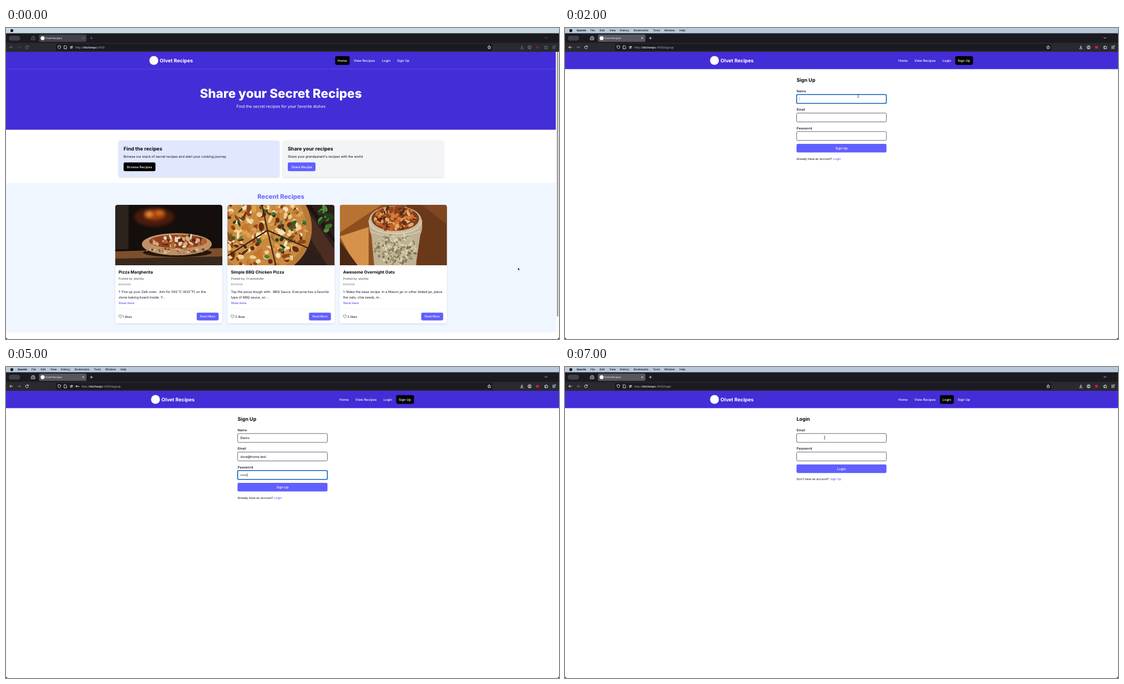
Recreate the animation shown at these times as an HTML page. Size 997 by 561 pixels, loop 8000 ms.

```html
<!DOCTYPE html>
<html lang="en">
<head>
<meta charset="utf-8">
<title>Recipe site sign-up</title>
<style>
  html, body { margin: 0; width: 100%; height: 100%; overflow: hidden; background: #fff; }
  svg { display: block; font-family: Inter, sans-serif; text-rendering: geometricPrecision; }
  text { white-space: pre; }
  .icon { fill: none; stroke: #fbfbfe; stroke-width: .8; stroke-linecap: round; stroke-linejoin: round; }
</style>
</head>
<body>
<svg id="stage" width="997" height="561" viewBox="0 0 997 561"></svg>
<script>
const INDIGO = '#432dd7', BUTTON = '#615fff', LINK = '#4f39f6', INK = '#08080f';
const BASE = 5.95, SMALL = 5.25;
const SITE = 'Olvet Recipes', EMAIL = 'dora@home.test';

// Text is placed by the middle of its capitals.
const text = (x, y, size, str, { fill = INK, weight = 400, anchor = 'start' } = {}) =>
  `<text x="${x}" y="${y + size * .364}" font-size="${size}" fill="${fill}" font-weight="${weight}"
    text-anchor="${anchor}">${str}</text>`;
const box = (x, y, w, h, fill, r = 0, extra = '') =>
  `<rect x="${x}" y="${y}" width="${w}" height="${h}" rx="${r}" fill="${fill}" ${extra}/>`;
const oval = (x, y, rx, ry, fill, extra = '') =>
  `<ellipse cx="${x}" cy="${y}" rx="${rx}" ry="${ry}" fill="${fill}" ${extra}/>`;
const path = (d, fill, extra = '') => `<path d="${d}" fill="${fill}" ${extra}/>`;
const icon = (x, y, d, extra = '') => `<path class="icon" transform="translate(${x} ${y})" d="${d}" ${extra}/>`;
const button = (x, y, w, h, label, fill, size = BASE) =>
  box(x, y, w, h, fill, 2.4) +
  text(x + w / 2, y + h / 2, size, label, { fill: '#fff', anchor: 'middle', weight: 500 });

function blobs(seed, count, cx, cy, rx, ry, size, colors) {
  const random = () => (seed = seed * 16807 % 2147483647) / 2147483647;
  let out = '';
  for (let i = 0; i < count; i++) {
    const angle = random() * 6.28, dist = Math.sqrt(random());
    const x = cx + Math.cos(angle) * dist * rx, y = cy + Math.sin(angle) * dist * ry;
    out += oval(x, y, size * (.5 + random()), size * (.3 + random() * .6), colors[i % colors.length],
      `transform="rotate(${random() * 180} ${x} ${y})"`);
  }
  return out;
}

const photos = [
  () => box(0, 0, 194, 109, '#140e0c') + box(0, 0, 24, 80, '#2c221e') +
    `<g filter="url(#soft)">${oval(70, 22, 36, 17, '#4a1a09') + oval(72, 18, 18, 8, '#a8400f') +
      oval(61, 17, 6, 4, '#ff9a3a') + oval(80, 14, 7, 3, '#f07d24')}</g>` +
    path('M0 84 L194 78 V109 H0Z', '#7d4f2d') + path('M0 97 L194 93 V109 H0Z', '#38281b') +
    oval(112, 86, 62, 8, '#24160d') + oval(111, 71, 63, 20, '#bd9166') + oval(113, 66, 52, 12, '#93401f') +
    blobs(19, 50, 113, 66, 47, 10, 4, ['#e6d6b6', '#b8602e', '#d2b083', '#512a17']) +
    blobs(5, 40, 111, 82, 56, 5, 2.5, ['#dcb688', '#6b4124', '#ab7b4d']),

  () => box(0, 0, 194, 109, '#2e1e1a') + path('M137 0 L194 82 V109 H180 L110 0Z', '#4b2d22') +
    path('M150 0 L194 62 V70 L141 0Z', '#1d120f') +
    oval(60, 42, 92, 88, '#b87a38') + oval(58, 42, 84, 80, '#c98a3f') +
    blobs(77, 260, 60, 44, 82, 74, 5.5, ['#efcf92', '#8f4519', '#dba251', '#f2e0b8', '#642c14', '#c5762f']) +
    blobs(41, 34, 72, 40, 70, 56, 4, ['#345f24', '#4f7d33', '#203f18']) +
    path('M72 46 L168 88 M72 46 L87 109 M72 46 L0 92 M72 46 L62 0', 'none', 'stroke="#3c2115" stroke-width="2.2"') +
    blobs(9, 20, 176, 26, 13, 22, 5, ['#3c7030', '#1f4119', '#568a3c']),

  () => box(0, 0, 194, 109, '#8d4f20') + path('M0 0 H75 L0 50Z', '#b87332') +
    path('M0 57 L52 40 V109 H28Z', '#d6924a') + path('M0 65 L32 109 H0Z', '#4c2814') +
    path('M120 0 H194 V109 H140Z', '#6a3919') + path('M148 0 H194 V36Z', '#7f4721') +
    path('M53 24 Q51 43 57 55 L62 109 H137 L145 55 Q151 42 147 24Z', '#bfb294') +
    blobs(31, 240, 100, 80, 37, 29, 2.8, ['#ddd3b8', '#9c916e', '#cbbd98', '#7d7355']) +
    oval(100, 27, 47, 25, '#cdbb98') + oval(100, 25, 43, 22, '#7c3f1e') +
    blobs(63, 130, 99, 24, 38, 20, 4, ['#da7a32', '#8d4422', '#e8a868', '#532a18', '#c46128']) +
    path('M52 28 Q56 51 100 52 Q144 51 148 28', 'none', 'stroke="#e4d9c2" stroke-width="1.8" opacity=".8"') +
    path('M56 48 Q100 66 144 48', 'none', 'stroke="#f1ead8" stroke-width="1.2" opacity=".7"')
];

const recipes = [
  ['Pizza Margherita', 'plumby', '9/22/2025', '1: Fire up your Zelk oven.  Aim for 500 ˚C (930 ˚F) on the',
    'stone baking board inside. Y...', 1],
  ['Simple BBQ Chicken Pizza', 'Crustwander', '9/17/2025',
    'Top the pizza dough with:  BBQ Sauce: Everyone has a favorite', 'type of BBQ sauce, so ...', 3],
  ['Awesome Overnight Oats', 'plumby', '9/17/2025',
    '1. Make the base recipe: In a Mason jar or other lidded jar, place', 'the oats, chia seeds, m...', 3]
];

function recipeCard([title, author, date, line1, line2, likes], i) {
  const grey = { fill: '#364153' }, body = { fill: '#101828' };
  return `<g transform="translate(${197 + 202.4 * i} 319)">` +
    box(0, 0, 193, 214, '#fff', 4.5, 'filter="url(#shadow)"') +
    `<g clip-path="url(#photo)">${photos[i]()}</g>` +
    text(6, 121, 7.5, title, { weight: 700 }) +
    text(6, 133.5, SMALL, 'Posted by: ' + author, grey) +
    text(6, 143.3, 4.45, date, { fill: '#4a5565' }) +
    text(6, 157.3, BASE, line1, body) + text(6, 166.7, BASE, line2, body) +
    text(6, 177, SMALL, 'Show more', { fill: LINK, weight: 500 }) +
    box(6, 187.6, 181, .5, '#e3e6ec') +
    icon(9, 201.2, 'M0 2.8 L-2.6 .2 C-4 -2 -1 -3.8 0 -1.6 C1 -3.8 4 -2 2.6 .2Z', 'style="stroke:#222b3a;stroke-width:.6"') +
    text(13.4, 201.4, BASE, likes + ' likes', body) +
    button(146.8, 194.6, 39.6, 13.8, 'Read More', BUTTON, SMALL) + '</g>';
}

function header(active, shift) {
  const links = [['Home', 598, 26], ['View Recipes', 627, 47], ['Login', 677.5, 25], ['Sign Up', 705, 32]];
  return oval(266.5 + shift, 58.5, 8, 8, '#fff') +
    text(277.3 + shift, 58.7, 8.9, SITE, { fill: '#fff', weight: 700 }) +
    links.map(([label, x, w]) =>
      (label === active ? box(x - 4.5 + shift, 50.8, w, 15.6, '#000', 2.4) : '') +
      text(x + shift, 58.5, BASE, label, { fill: '#fff', weight: 500 })).join('');
}

const promo = (x, w, fill, title, line, label, bw, color) =>
  box(x - 9, 203, w, 66, fill, 3, 'filter="url(#shadow)"') +
  text(x, 218, 8.95, title, { weight: 700 }) + text(x, 232, BASE, line) +
  button(x, 242.6, bw, 15.6, label, color);

const homePage = () =>
  box(0, 43, 991.5, 140.5, INDIGO) + box(0, 73.8, 991.5, .5, BUTTON) + header('Home', 0) +
  text(495.5, 118, 22.5, 'Share your Secret Recipes', { fill: '#fff', weight: 800, anchor: 'middle' }) +
  text(495.7, 141.2, 7.3, 'Find the secret recipes for your favorite dishes', { fill: '#fff', anchor: 'middle' }) +
  promo(212, 290, '#e0e7ff', 'Find the recipes', 'Browse our stack of secret recipes and start your cooking journey',
    'Browse Recipes', 57.5, '#000') +
  promo(508, 290, '#f3f4f6', 'Share your recipes', 'Share your grandparent\'s recipes with the world',
    'Share Recipe', 50, BUTTON) +
  box(0, 279.5, 991.5, 269.5, '#eff6ff') +
  text(495.5, 303.5, 11.2, 'Recent Recipes', { fill: BUTTON, weight: 700, anchor: 'middle' }) +
  recipes.map(recipeCard).join('') +
  box(991.5, 43, 5.5, 518, '#fafafa') + box(993.2, 43, 2.5, 477.5, '#979797', 1.2);

function formPage({ page, values = [], focus = -1, caret, popup }) {
  const signup = page === 'Sign Up';
  const labels = signup ? ['Name', 'Email', 'Password'] : ['Email', 'Password'];
  const end = 128 + 33.4 * labels.length;
  const fields = labels.map((label, i) => {
    const y = 128 + 33.4 * i, value = values[i] ?? '', focused = i === focus;
    const dots = label === 'Password' ? value.length : 0;
    const shown = dots ? '' : value;
    const mark = focused && caret && !dots ? '<tspan dx="-.6" font-weight="200">|</tspan>' : '';
    return text(417.5, y - 14.3, BASE, label, { weight: 500 }) +
      box(417.6, y - 8, 161.8, 16, '#fff', 2,
        focused ? 'stroke="#0b5fc4" stroke-width="1.6"' : 'stroke="#42425c" stroke-width=".8"') +
      text(422.5, y, BASE, shown + mark) +
      Array.from({ length: dots }, (_, n) => oval(423.9 + 2.95 * n, y + .3, .85, .85, INK)).join('') +
      (dots && focused && caret ? box(422.8 + 2.95 * dots, y - 3.5, .6, 7, INK) : '');
  }).join('');
  const [question, answer, x] = signup
    ? ['Already have an account?', 'Login', 483.6] : ['Don\'t have an account?', 'Sign Up', 478.2];
  return box(0, 43, 997, 31, INDIGO) + box(0, 73.8, 997, .5, BUTTON) + header(page, 3) +
    text(417.5, 93.5, 8.95, page, { weight: 700 }) + fields +
    button(417.4, end - 19.1, 162.2, 15.5, page, BUTTON) +
    text(417.5, end + 7.4, SMALL, question) + text(x, end + 7.4, SMALL, answer, { fill: LINK }) +
    (popup ? box(417.8, 169.6, 161.4, 13.4, '#17171b', 1.5, 'filter="url(#shadow)"') +
      text(420, 176.4, 4.9, 'Manage Passwords', { fill: '#fbfbfe' }) : '');
}

function browser({ idle, url = '', key }) {
  const light = { fill: '#fbfbfe' }, x = key ? 136 : 125;
  const menu = [['File', 46], ['Edit', 62.5], ['View', 80], ['History', 98.8], ['Bookmarks', 124],
    ['Tools', 158.5], ['Window', 179], ['Help', 206.3]];
  return box(0, 0, 997, 10, idle ? '#c9d9e3' : '#b6cadb') + oval(10.5, 4.7, 2.6, 2.6, '#0b0b0e') +
    (idle ? '' : text(21, 4.6, 4.9, 'Quenlo', { weight: 700 }) +
      menu.map(([label, mx]) => text(mx, 4.6, 4.9, label, { weight: 500 })).join('')) +
    box(0, 9.5, 997, 18, '#1b1a20') + box(0, 26.8, 997, 16.2, '#2a2930') +
    box(90, 28.6, 787, 12.6, '#1b1a20', 2) +
    box(5, 14, 20.5, 8.8, '#413f47', 4.4) +
    box(59.5, 11.8, 85.5, 13.2, idle ? '#42414a' : '#57565e', 2) +
    oval(66, 18.3, 3.6, 3.6, '#fff') + text(71, 18.4, 4.6, SITE, light) +
    `<g opacity="${idle ? .4 : 1}">` +
    icon(49, 18.3, 'M-3 -1 H3 V3 H-3Z M-2 -3 H2 M-1 1 H1') +
    icon(139.3, 18.3, 'M-1.3 -1.3 L1.3 1.3 M1.3 -1.3 L-1.3 1.3') +
    icon(154, 18.3, 'M-2 0 H2 M0 -2 V2') + icon(973.5, 18, 'M-2 -1 L0 1 L2 -1') +
    icon(9.5, 34.8, 'M2.6 0 H-2.6 M-.4 -2.2 L-2.6 0 L-.4 2.2') +
    icon(23.5, 34.8, 'M-2.6 0 H2.6 M.4 -2.2 L2.6 0 L.4 2.2', url || idle ? 'opacity=".4"' : '') +
    icon(37.7, 34.8, 'M2.3 -1.4 A2.6 2.6 0 1 0 2.6 .8 M2.6 -2.8 V-1 H.8') +
    icon(930, 34.8, 'M0 -2.8 V1 M-1.8 -.7 L0 1.1 L1.8 -.7 M-2.6 2.6 H2.6') +
    icon(944, 34.8, 'M-3 0 A3 3 0 1 1 3 0 A3 3 0 1 1 -3 0 M-1.8 2 Q0 0 1.8 2 M-.8 -1 A.8 .8 0 1 1 .8 -1 A.8 .8 0 1 1 -.8 -1') +
    box(955.8, 32.6, 4.8, 4.4, '#d3203a', .5) +
    icon(974, 34.8, 'M-2.5 -1.2 H-.9 V-2.5 H.7 V-1.2 H2.3 V2.7 H-2.5 V1.4 H-1.2 V.1 H-2.5Z') +
    icon(987.8, 34.9, 'M-2.4 -2 H2.4 M-2.4 0 H2.4 M-2.4 2 H2.4') + oval(990.3, 32.2, 1.3, 1.3, '#2ac3a2') +
    '</g>' +
    icon(96.2, 34.8, 'M0 -2.9 L2.6 -2 Q2.6 1.6 0 3 Q-2.6 1.6 -2.6 -2Z') +
    icon(107.2, 34.8, 'M-2.1 -2.8 H.7 L2.1 -1.4 V2.8 H-2.1Z') +
    icon(118, 34.8, 'M-2.4 -1.2 H2.4 M-2.4 1.2 H2.4 M.8 -2.2 V-.2 M-.8 .2 V2.2') +
    (key ? icon(128.6, 34.8, 'M-2.8 0 A1.2 1.2 0 1 1 -.4 0 A1.2 1.2 0 1 1 -2.8 0 M-.4 0 H2.8 V1.2') : '') +
    icon(871.2, 34.8, 'M0 -2.9 L.9 -.9 L3 -.7 L1.4 .7 L1.9 2.8 L0 1.7 L-1.9 2.8 L-1.4 .7 L-3 -.7 L-.9 -.9Z') +
    text(x, 35, 5.2, `http://<tspan fill="#fff" font-weight="500">kitchenpc</tspan>:4100${url}`, { fill: '#b2b1b9' });
}

function pointer({ arrow, beam }) {
  if (arrow) return path('M0 0 V5 L1.2 4 L2 5.7 L2.8 5.3 L2 3.7 H3.6Z', '#000',
    `transform="translate(${arrow})" stroke="#fff" stroke-width=".4"`);
  if (beam) return path('M-1.2 -2.8 Q0 -2.8 0 -2 Q0 -2.8 1.2 -2.8 M0 -2 V2 M-1.2 2.8 Q0 2.8 0 2 Q0 2.8 1.2 2.8', 'none',
    `transform="translate(${beam})" stroke="#222" stroke-width=".7"`);
  return '';
}

const signUp = { page: 'Sign Up', url: '/signup' };
// One entry per second.
const states = [
  { idle: true, arrow: [923, 432] },
  { arrow: [732.5, 97] },
  { ...signUp, focus: 0, caret: true, beam: [528.5, 122.7] },
  { ...signUp, focus: 0, caret: true, values: ['Demo'] },
  { ...signUp, focus: 1, caret: true, values: ['Demo', EMAIL.slice(0, -1)], popup: true },
  { ...signUp, focus: 2, caret: true, values: ['Demo', EMAIL, 'xxxx'], key: true },
  { ...signUp, focus: 2, values: ['Demo', EMAIL, 'xxxxxxxx'], key: true, beam: [550, 136.8] },
  { page: 'Login', url: '/login', beam: [468, 127.5] }
];

const defs = `<defs>
  <filter id="soft" x="-50%" y="-50%" width="200%" height="200%"><feGaussianBlur stdDeviation="3"/></filter>
  <filter id="shadow"><feDropShadow dx="0" dy=".8" stdDeviation=".9" flood-opacity=".16"/></filter>
  <clipPath id="photo"><path d="M0 109 V4.5 Q0 0 4.5 0 H188.5 Q193 0 193 4.5 V109Z"/></clipPath>
</defs>`;
const corners = path('M0 557 Q0 561 4 561 H0Z M997 557 Q997 561 993 561 H997Z', '#000');
const stage = document.getElementById('stage');
let current = -1;

function tick() {
  const second = Math.floor(performance.now() % 8000 / 1000);
  if (second !== current) {
    current = second;
    const state = states[second];
    stage.innerHTML = defs + box(0, 0, 997, 561, '#fff') + (state.page ? formPage(state) : homePage()) +
      browser(state) + corners + pointer(state);
  }
  requestAnimationFrame(tick);
}
tick();
</script>
</body>
</html>
```
